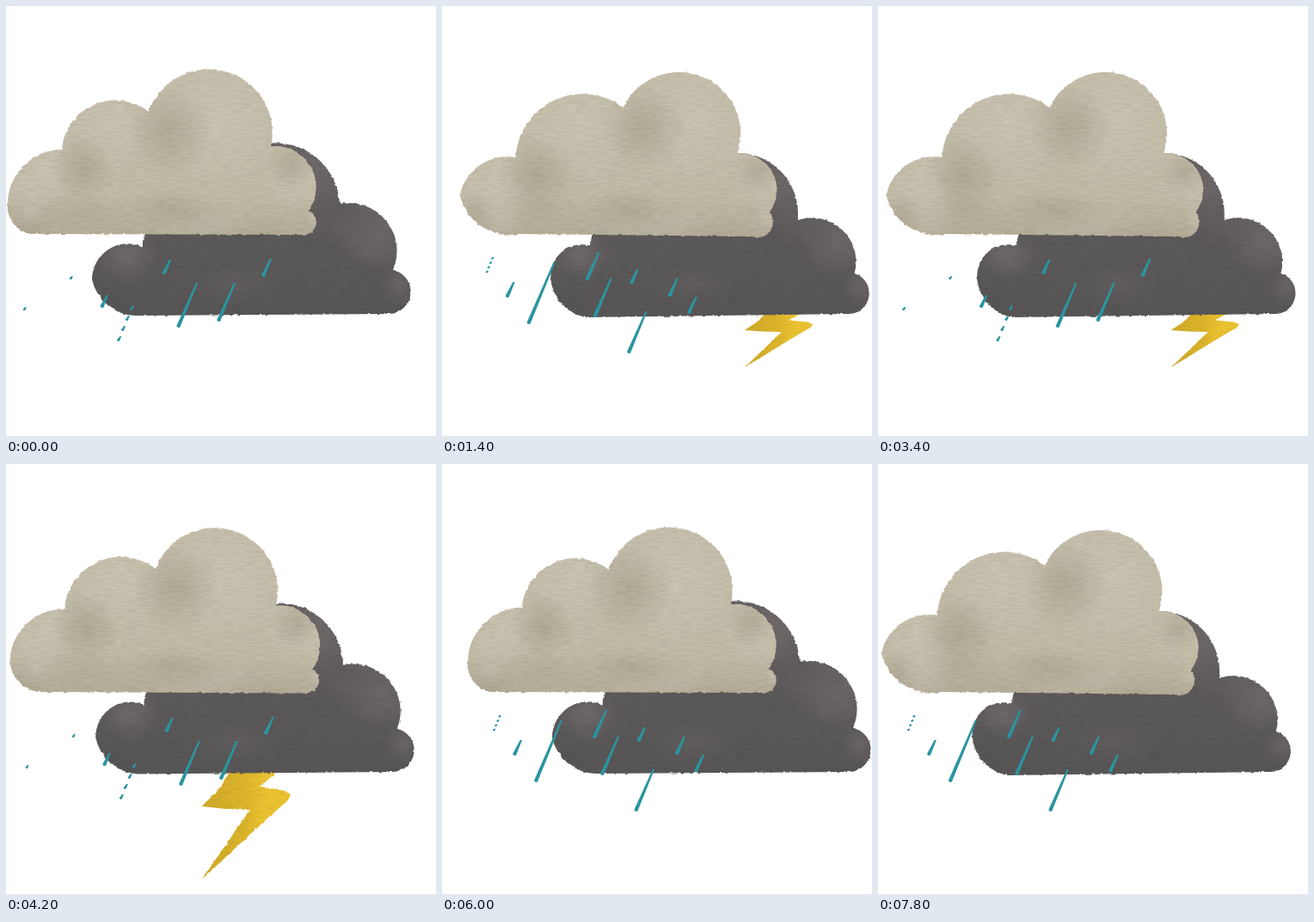
An HTML page for the animation above (8.01 s loop, 500x500 px).

```html
<!DOCTYPE html>
<html lang="en">
<head>
<meta charset="utf-8">
<title>Storm clouds</title>
<style>
  html, body { margin: 0; width: 100%; height: 100%; overflow: hidden; background: #fff; }
  svg { display: block; width: 100%; height: 100%; }
  .rain { fill: #2a949f; }
</style>
</head>
<body>
<svg viewBox="0 0 500 500">
  <defs>
    <filter id="paint" filterUnits="userSpaceOnUse" x="-10" y="60" width="520" height="440" color-interpolation-filters="sRGB">
      <feTurbulence type="fractalNoise" baseFrequency=".2" numOctaves="2" seed="4" result="edge"/>
      <feDisplacementMap in="SourceGraphic" in2="edge" scale="3" xChannelSelector="R" yChannelSelector="G" result="shape"/>
      <feTurbulence type="fractalNoise" baseFrequency=".08 .5" numOctaves="2" seed="9"/>
      <feColorMatrix values="0 0 0 0 .1  0 0 0 0 .09  0 0 0 0 .07  .14 0 0 0 -.05"/>
      <feComposite in2="shape" operator="in" result="grain"/>
      <feMerge><feMergeNode in="shape"/><feMergeNode in="grain"/></feMerge>
    </filter>
    <linearGradient id="pale" x1="0" y1="70" x2="0" y2="270" gradientUnits="userSpaceOnUse">
      <stop stop-color="#c6bfac"/><stop offset=".75" stop-color="#c3bca8"/><stop offset="1" stop-color="#b4ad99"/>
    </linearGradient>
    <linearGradient id="slate" x1="0" y1="160" x2="0" y2="360" gradientUnits="userSpaceOnUse">
      <stop stop-color="#676263"/><stop offset=".6" stop-color="#5c595a"/><stop offset="1" stop-color="#585656"/>
    </linearGradient>
    <linearGradient id="gold">
      <stop stop-color="#d0aa28"/><stop offset=".5" stop-color="#dfb72c"/><stop offset=".7" stop-color="#ecc431"/>
    </linearGradient>
  </defs>
  <g id="sky"></g>
</svg>
<script>
const NS = 'http://www.w3.org/2000/svg';
const LOOP = 8010, STEP = 200, LAST = 39;
const SLANT = -.41;
const POSES = [0, 1, .2];
const sky = document.getElementById('sky');
const defs = document.querySelector('defs');

function add(parent, tag, attrs = {}) {
  const el = document.createElementNS(NS, tag);
  for (const key in attrs) el.setAttribute(key, attrs[key]);
  return parent.appendChild(el);
}

function softTone(id, color) {
  const tone = add(defs, 'radialGradient', { id });
  add(tone, 'stop', { 'stop-color': color });
  add(tone, 'stop', { offset: 1, 'stop-color': color, 'stop-opacity': 0 });
}
softTone('paleShade', '#a39b86');
softTone('paleGlow', '#cec8b7');
softTone('slateShade', '#4d4b4c');
softTone('slateGlow', '#777071');

function seeded(seed) {
  return () => (seed = seed * 16807 % 2147483647) / 2147483647;
}

const points = (text) => text.split(' ').map((pair) => pair.split(',').map(Number));
const mix = (a, b, t) => a.map(([x, y], i) => [x + (b[i][0] - x) * t, y + (b[i][1] - y) * t]);

// Neighbouring knots with the bulge (height / chord) of the arc between them.
const lobesOf = (knots, bulges) => knots.map((from, i) => {
  const to = knots[(i + 1) % knots.length];
  return { from, to, bulge: bulges[i], chord: Math.hypot(to[0] - from[0], to[1] - from[1]) };
});

function outline(lobes) {
  const arcs = lobes.map(({ to, bulge, chord }) => {
    if (!bulge) return `L${to}`;
    const r = chord * (.25 + bulge * bulge) / (2 * bulge);
    return `A${r} ${r} 0 ${+(bulge > .5)} 1 ${to}`;
  });
  return `M${lobes[0].from}${arcs.join('')}Z`;
}

function cloud(fill, knots, bulges, pose) {
  const lobes = lobesOf(knots, bulges), d = outline(lobes), id = fill + pose;
  add(add(defs, 'clipPath', { id }), 'path', { d });
  const g = add(sky, 'g', { filter: 'url(#paint)' });
  add(g, 'path', { d, fill: `url(#${fill})` });
  const inner = add(g, 'g', { 'clip-path': `url(#${id})` });
  const blob = (cx, cy, rx, ry, tone, opacity) =>
    add(inner, 'ellipse', { cx, cy, rx, ry, opacity, fill: `url(#${fill}${tone})` });

  // Each round lobe is lit in its middle and shaded beside its notch.
  for (const { from, to, bulge, chord } of lobes) {
    if (bulge < .2) continue;
    const cx = (from[0] + to[0]) / 2, cy = (from[1] + to[1]) / 2;
    blob(cx + 12, cy - 8, chord * .5, chord * .5, 'Glow', .6);
    blob(from[0] + 24, from[1] + 22, chord * .35, chord * .35, 'Shade', fill === 'pale' ? .55 : .15);
  }
  const [left, right] = [knots[0][0], Math.max(...knots.map((p) => p[0]))];
  const random = seeded(31 + lobes.length);
  for (let i = 0; i < 10; i++)
    blob(left + random() * (right - left), 190 + random() * 150, 50, 24, i % 2 ? 'Glow' : 'Shade', .25);
  return g;
}

const clouds = (fill, a, b, bulges) =>
  POSES.map((t, i) => cloud(fill, mix(points(a), points(b), t), bulges, i));

// A tapered brush mark; a broken one falls apart into shorter marks.
function drop([x, y, len, broken]) {
  if (broken) {
    const part = len / 4;
    return [0, 1, 2, 3].map((i) => drop([x + SLANT * part * i, y + part * i, part * .5])).join('');
  }
  const r = Math.min(2.3, 1.3 + len / 14), top = r * .5;
  const x2 = x + SLANT * len, y2 = y + len;
  return `M${x - top} ${y}L${x + top} ${y}L${x2 + r} ${y2 - r}A${r} ${r} 0 0 1 ${x2 - r} ${y2 - r}Z`;
}
const rain = (drops) => add(sky, 'path', { class: 'rain', d: drops.map(drop).join('') });

const bolt = add(sky, 'polygon', {
  points: '262,350 312,350 309,361 292,375 322,380 328,385 325,391 298,415 225,483 281,402 252,401 225,398 246,377',
  fill: 'url(#gold)', filter: 'url(#paint)'
});

const slates = clouds('slate',
  '100,318 159,280 164,262 303,160 388,230 450,307 446,358 150,360',
  '107,318 154,279 157,263 325,171 394,249 460,311 452,358 148,362',
  [.27, .1, 0, .22, .3, .44, 0, .17]);

const rains = [
  rain([
    [191, 295, 17], [308, 294, 21], [222, 322, 52], [266, 322, 45],
    [118, 336, 15], [148, 348, 48, true], [77, 314, 4], [23, 350, 4]
  ]),
  rain([
    [40, 292, 21, true], [64, 321, 18], [111, 298, 72], [163, 286, 33], [208, 306, 17],
    [177, 317, 45], [254, 317, 21], [276, 338, 20], [218, 355, 49]
  ])
];

const pales = clouds('pale',
  '2,228 65,167 166,123 308,163 352,238 348,266 28,265',
  '1,220 66,176 191,118 324,171 361,240 342,268 70,265',
  [.2, .3, .47, .32, .38, 0, .2]);

// Beats of the sway on which a tall bolt strikes, with its drop in height.
const strikes = { 1: 0, 2: 7, 6: 8, 13: 10 };

const show = (el, on) => el.setAttribute('visibility', on ? 'visible' : 'hidden');
const pick = (list, index) => list.forEach((el, i) => show(el, i === index));

let shown = -1;
function draw(now) {
  const n = Math.min(LAST, Math.floor((now % LOOP) / STEP));
  if (n !== shown) {
    shown = n;
    const beat = n % 20, side = n % 10 === 7;
    const sway = 2.8 * (10 - Math.abs(10 - beat));
    const pose = n % 8 === 5 ? 2 : n % 2;
    sky.setAttribute('transform', `translate(${sway.toFixed(2)} 0)`);
    pick(slates, pose);
    pick(pales, pose);
    pick(rains, n >> 1 & 1);
    show(bolt, side || beat in strikes);
    bolt.setAttribute('transform', side
      ? 'translate(159 174) scale(.77 .51)'
      : `translate(0 ${strikes[beat] || 0})`);
  }
  requestAnimationFrame(() => draw(performance.now() - start));
}
const start = performance.now();
draw(0);
</script>
</body>
</html>
```
